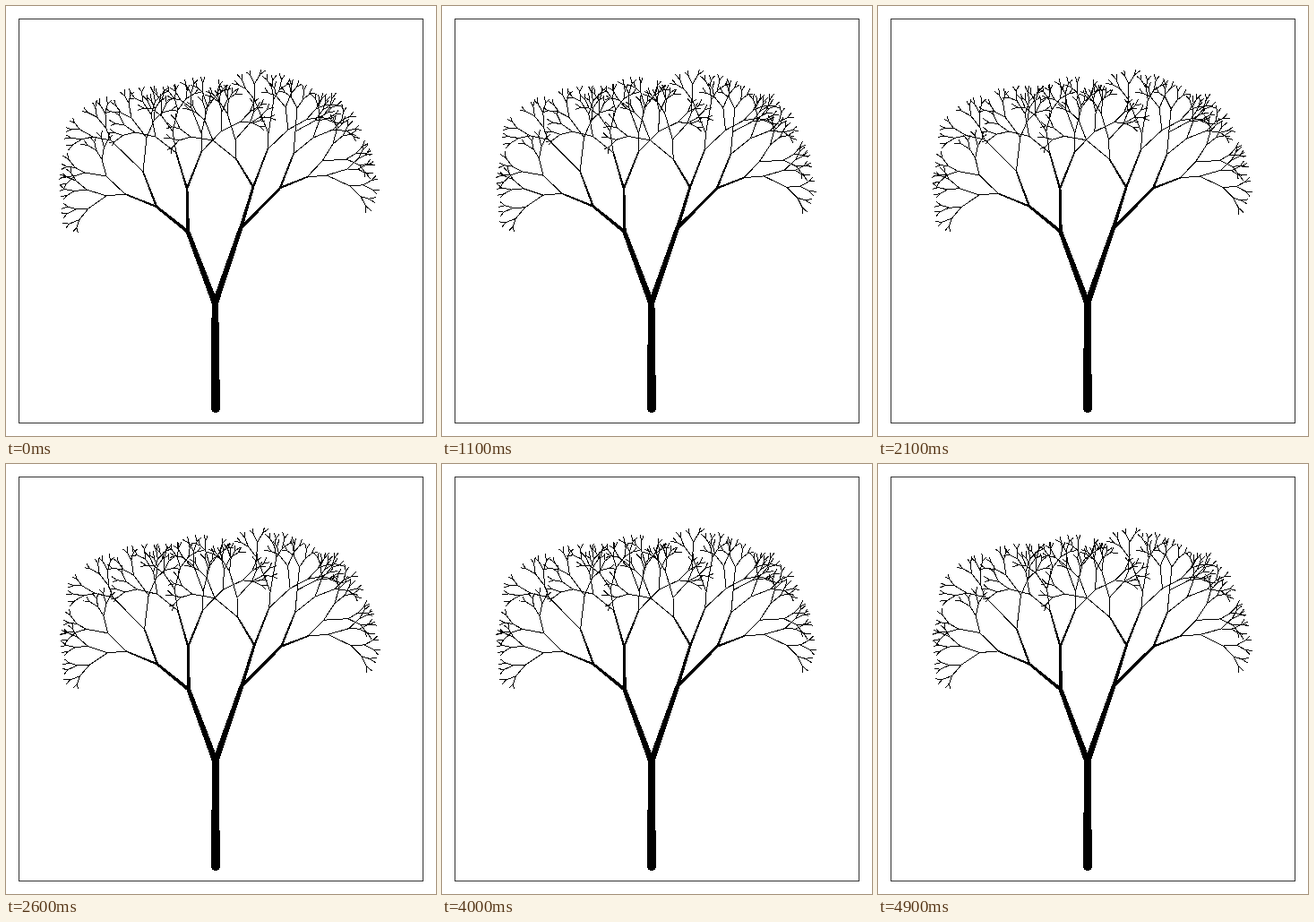
These frames come from a looping animation (480x480 px, 5000 ms). An HTML page:

```html
<!DOCTYPE html>
<html lang="en">
<head>
<meta charset="utf-8">
<title>Swaying tree</title>
<style>
  html, body { margin: 0; width: 100%; height: 100%; overflow: hidden; background: #fff; }
  svg { display: block; width: 100vw; height: 100vh; }
</style>
</head>
<body>
<svg viewBox="0 0 480 480" shape-rendering="crispEdges">
  <rect x="14.5" y="14.5" width="451" height="451" fill="none" stroke="#333"/>
  <path id="twigs" fill="none" stroke="#000" stroke-width="1"/>
  <path id="limbs" fill="#000"/>
</svg>
<script>
const LOOP = 5000, STEP = 100, DEPTH = 8;
const ROOT = { x: 234, y: 449 };

// Branch ends at rest, one row per level, left to right
const JOINTS = [
  [233.4, 332],
  [203, 252, 262, 248],
  [168, 224, 202, 204, 276, 202, 306, 203],
  [133, 210, 153, 185, 190, 164, 218, 163, 257, 171, 292, 160, 321, 165, 336, 191],
  [112, 212, 112, 190, 117, 150, 157, 147, 167, 146, 186, 140, 218, 142, 240, 140,
   231, 150, 256, 149, 293, 142, 315, 138, 323, 140, 343, 147, 353, 173, 358, 189],
  [92, 226, 90, 205, 88, 186, 107, 171, 97, 146, 112, 137, 140, 125, 165, 128,
   144, 141, 162, 121, 174, 123, 192, 116, 207, 114, 225, 113, 241, 118, 262, 129,
   206, 146, 222, 128, 247, 120, 272, 131, 277, 104, 299, 104, 312, 113, 335, 127,
   325, 114, 345, 128, 350, 127, 365, 138, 365, 154, 380, 171, 381, 182, 384, 201]
].flat();

const TWIG = { 6: 14.5, 7: 10.5, 8: 7 };
// Start and end radius of the thick levels
const RADIUS = [[5, 3.8], [3.5, 2.4], [2, 1.4], [1.2, 0.8]];

// Time in ms, amount of lean
const SWAY = [
  [0, 0], [300, 3.2], [600, 1], [900, 4], [1100, 2.7], [1300, 4.3], [1600, 2],
  [1800, 0.5], [2100, 3.2], [2400, 0.5], [2600, 3.8], [2800, 4.3], [3050, 1.2],
  [3300, 6], [3600, 3], [3800, 0.5], [4000, 3.8], [4100, 4.3], [4300, 0.6],
  [4600, 5.6], [4800, 5.4], [5000, 3.4]
];
const LEAN = 0.0008;

let seed = 29;
function rand(lo, hi) {
  seed = (seed * 16807) % 2147483647;
  return lo + (hi - lo) * seed / 2147483647;
}

function buildTree() {
  const tree = [];
  const count = 2 ** (DEPTH + 1) - 1;
  for (let i = 0; i < count; i++) {
    const from = i ? tree[(i - 1) >> 1] : ROOT;
    const level = Math.floor(Math.log2(i + 1));
    let angle, length;
    if (2 * i < JOINTS.length) {
      const dx = JOINTS[2 * i] - from.x, dy = JOINTS[2 * i + 1] - from.y;
      angle = Math.atan2(dy, dx);
      length = Math.hypot(dx, dy);
    } else {
      const side = i % 2 ? -1 : 1;
      angle = from.angle + side * rand(0.28, 0.58);
      length = TWIG[level] * rand(0.82, 1.18);
    }
    tree.push({
      level, angle, length,
      x: from.x + length * Math.cos(angle),
      y: from.y + length * Math.sin(angle)
    });
  }
  return tree;
}

function swayAt(t) {
  const k = SWAY.findIndex(s => s[0] > t);
  const [t0, a] = SWAY[k - 1], [t1, b] = SWAY[k];
  const p = (t - t0) / (t1 - t0);
  return a + (b - a) * (1 - Math.cos(Math.PI * p)) / 2;
}

const pt = (x, y) => x.toFixed(2) + " " + y.toFixed(2);

// Tapered bar with round ends
function limb(a, b, angle, [r0, r1]) {
  const nx = Math.sin(angle), ny = -Math.cos(angle);
  const edge = (p, r) => pt(p.x + nx * r, p.y + ny * r);
  return `M${edge(a, r0)}L${edge(b, r1)}A${r1} ${r1} 0 0 1 ${edge(b, -r1)}` +
    `L${edge(a, -r0)}A${r0} ${r0} 0 0 1 ${edge(a, r0)}Z`;
}

const tree = buildTree();
const limbs = document.getElementById("limbs");
const twigs = document.getElementById("twigs");

function draw(t) {
  const bend = swayAt(t) * LEAN;
  const ends = [];
  let thick = "", thin = "";
  tree.forEach((n, i) => {
    const a = i ? ends[(i - 1) >> 1] : ROOT;
    const angle = n.angle + bend * (n.level + 1);
    const b = { x: a.x + n.length * Math.cos(angle), y: a.y + n.length * Math.sin(angle) };
    ends.push(b);
    if (n.level < RADIUS.length) thick += limb(a, b, angle, RADIUS[n.level]);
    else thin += `M${pt(a.x, a.y)}L${pt(b.x, b.y)}`;
  });
  limbs.setAttribute("d", thick);
  twigs.setAttribute("d", thin);
}

const start = performance.now();
let shown = -1;
function tick() {
  const t = Math.floor((performance.now() - start) % LOOP / STEP) * STEP;
  if (t !== shown) draw(shown = t);
  requestAnimationFrame(tick);
}
tick();
</script>
</body>
</html>
```
